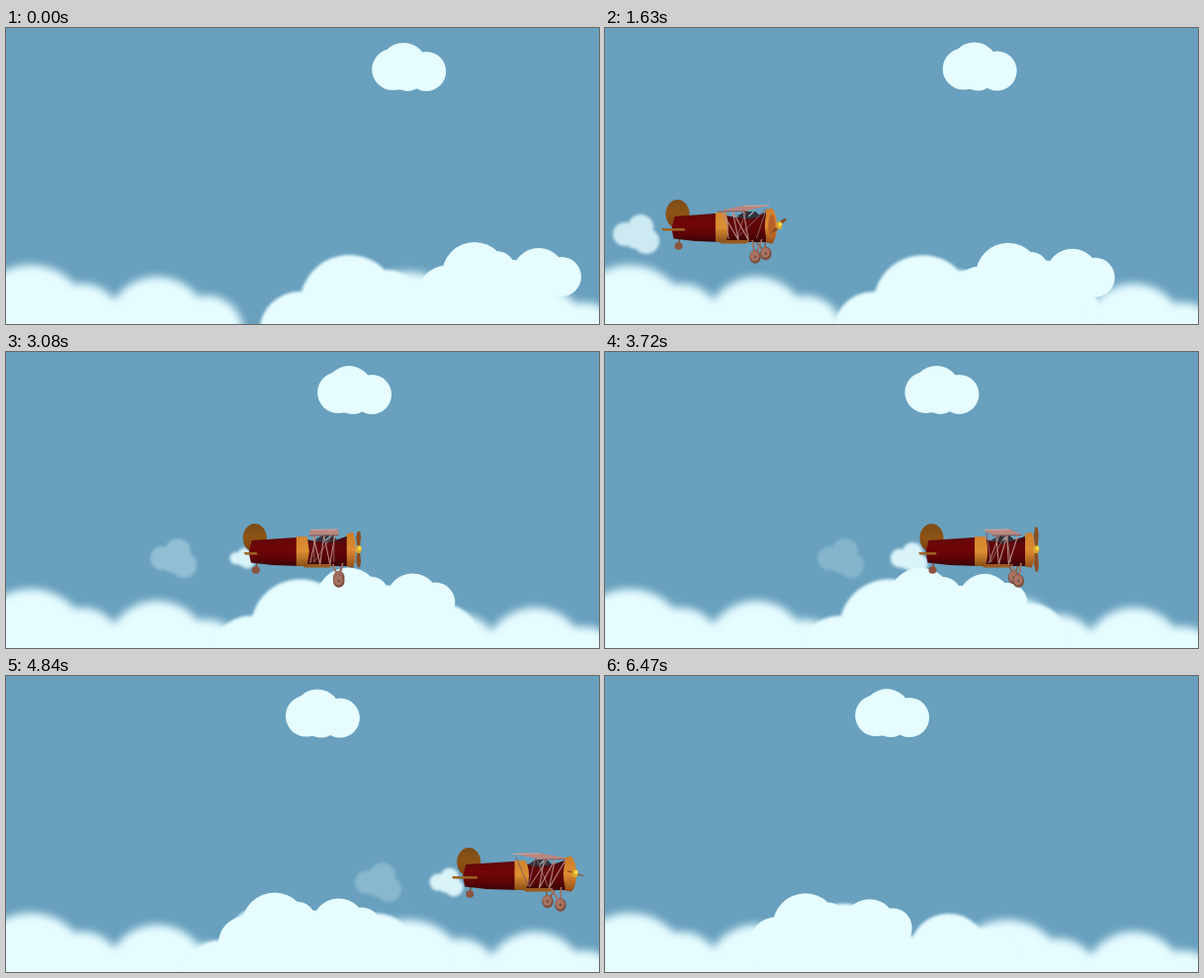
Animation of 600 by 300 pixels, one loop 6570 ms. Source, as an HTML page with a canvas:

```html
<!DOCTYPE html>
<html lang="en">
<head>
<meta charset="utf-8">
<title>Biplane above the clouds</title>
<style>
  html, body { margin: 0; width: 100%; height: 100%; overflow: hidden; background: #68a0be; }
  canvas { display: block; }
</style>
</head>
<body>
<canvas id="stage" width="600" height="300"></canvas>
<script>
const ctx = document.getElementById('stage').getContext('2d');
const LOOP = 6570, SKY = '#68a0be', CLOUD = '#e6fcff';

// Clouds are unions of circles: [x, y, radius]
const TOP = [[21, 42, 21], [32, 39, 24], [36, 46, 18], [55, 44, 20]];
const BACK = [[25, 300, 60], [78, 297, 38], [153, 304, 52], [203, 308, 37]];
const MIDDLE = [[-50, 308, 41], [0, 280, 50], [38, 280, 35], [106, 280, 40], [145, 290, 35]];
const FRONT = [[-29, 269, 28], [0, 250, 33], [22, 246, 20], [40, 262, 27], [65, 250, 27], [88, 252, 20]];
const PUFF = [[-12, 0, 12], [0, 1, 14], [4, -7, 13], [10, 7, 13]];

function cloud(lobes, x, y, blur, base, scale = 1) {
  ctx.filter = blur ? `blur(${blur}px)` : 'none';
  ctx.fillStyle = CLOUD;
  ctx.beginPath();
  for (const [cx, cy, r] of lobes) {
    ctx.moveTo(x + (cx + r) * scale, y + cy * scale);
    ctx.arc(x + cx * scale, y + cy * scale, r * scale, 0, 7);
  }
  if (base) ctx.rect(x + base[0], base[1], base[2], 320 - base[1]);
  ctx.fill();
  ctx.filter = 'none';
}

function oval(x, y, rx, ry, fill) {
  ctx.fillStyle = fill;
  ctx.beginPath();
  ctx.ellipse(x, y, rx, ry, 0, 0, 7);
  ctx.fill();
}

function poly(fill, ...pts) {
  ctx.fillStyle = fill;
  ctx.beginPath();
  pts.forEach(([x, y]) => ctx.lineTo(x, y));
  ctx.closePath();
  ctx.fill();
}

function line(color, width, ...pts) {
  ctx.strokeStyle = color;
  ctx.lineWidth = width;
  ctx.beginPath();
  pts.forEach(([x, y]) => ctx.lineTo(x, y));
  ctx.stroke();
}

function shade(y0, y1, ...colors) {
  const g = ctx.createLinearGradient(0, y0, 0, y1);
  colors.forEach((c, i) => g.addColorStop(i / (colors.length - 1), c));
  return g;
}

function wheel(x, y) {
  oval(x, y, 5.8, 6.8, '#7d4f40');
  oval(x - .5, y - 1, 4.5, 5.2, '#a87461');
  oval(x, y, 1.3, 1.5, '#7d4f40');
}

// v is the viewing angle: -1 seen from ahead, 1 seen from behind
function plane(tail, t) {
  const v = (tail - 240) / 250, turn = Math.abs(v);
  const band = 60 + 5 * v, cowl = 110 + 5 * v, hub = 117 + 3 * v;
  const near = 82 + 20 * v, far = 82 - 14 * v;
  ctx.save();
  ctx.translate(tail, 0);
  ctx.lineJoin = 'round';

  // landing gear, far side
  line('#85594a', 1.5, [90, 215], [97 - 6 * v, 228], [100, 215]);
  wheel(97 - 6 * v, 228.5);
  line('#7a4934', 1.5, [14, 214], [13, 221]);
  oval(13, 221, 4, 3.8, '#8d533d');

  // tail and body
  oval(12, 188.5, 12, 14.5, shade(174, 203, '#7c4c18', '#8e5314', '#774110'));
  poly(shade(187, 217, '#5c0a0c', '#720508', '#640407', '#3a0305'),
    [9, 191], [band, 187.5], [band, 217], [30, 216], [8, 213.5], [6, 203]);
  const reach = 7 * turn;
  poly('#9c6222', [1 - reach, 203], [14 + reach, 203], [15 + reach, 205.5], [2 - reach, 205.5]);
  poly(shade(187, 217, '#3d0f12', '#650609', '#5a0407', '#380305'),
    [band, 189], [band + 14, 192], [cowl - 14, 190], [cowl, 185], [cowl, 217], [band, 217]);
  poly('#33323c', [72, 191], [80, 186], [91, 186], [96, 191], [84, 194]);
  line('#8fb4c2', 1.2, [84, 191], [89, 186]);

  // lower wing and yellow band
  poly('#9a5a1e', [60 + 6 * v, 215], [90 + 6 * v, 215], [88 + 9 * v, 218.5], [62 + 9 * v, 218.5]);
  const edge = 3 + 3 * turn;
  const bandShade = shade(187, 217, '#d38531', '#dc8f32', '#8a4f18');
  poly(bandShade,
    [band - 6, 187], [band + 5, 187], [band + 7, 202], [band + 5, 217], [band - 6, 217]);
  oval(band + (v < 0 ? 1 : 3), 202, edge, 15, bandShade);

  // struts and upper wing
  const strut = '#b98d86';
  line('#8b625f', 1, [far - 10, 183], [72, 213], [far + 10, 183], [92, 213]);
  line(strut, 1.1, [near - 11, 186], [78 + 6 * v, 215], [near, 186], [88 + 6 * v, 215], [near + 11, 186]);
  line(strut, 1, [near - 8, 186], [68 + 6 * v, 214]);
  poly('#b98780', [far - 14, 180], [far + 14, 179.5], [near + 15, 185], [near - 15, 185.5]);
  line('#8b5a55', 1, [near - 15, 186], [near + 15, 185.5]);
  line('#d0a7a0', 1, [far - 13, 180.3], [far + 13, 180]);

  // engine
  const rx = 4 + 3 * turn;
  const cowlShade = shade(183, 218, '#cf7d2c', '#df8b31', '#944d18');
  poly(cowlShade, [cowl - 5, 184], [cowl + 2, 183], [cowl + 2, 218.5], [cowl - 5, 217.5]);
  oval(cowl, 200.8, rx, 17.7, cowlShade);
  if (v < -.25) oval(cowl + 1, 201, rx * .6, 12, '#b5622a');

  // propeller
  const a = .4 + .0156 * (t - 2140);
  const dx = 9 * v * Math.sin(a), dy = 22.5 * Math.cos(a);
  for (const s of [-1, 1])
    poly('#8a4e20', [hub - 1, 200], [hub + s * dx * .65 - 2.6, 200 - s * dy * .65],
      [hub + s * dx - 1, 200 - s * dy], [hub + s * dx + 1.5, 200 - s * dy],
      [hub + s * dx * .65 + 2.4, 200 - s * dy * .65], [hub + 1, 200]);
  oval(hub, 200, 3, 4, '#dda82c');
  oval(hub + 1, 199, 1.6, 2, '#ffe04a');

  // landing gear, near side
  line('#a0705f', 1.8, [91 + 5 * v, 215], [97 + 9 * v, 231], [101 + 5 * v, 214]);
  wheel(97 + 9 * v, 232);
  ctx.restore();
}

function smoke(t) {
  for (let n = 0; n < 8; n++) {
    const age = t - 1340 - 570 * n;
    if (age < 0 || age > 820) continue;
    ctx.globalAlpha = Math.min(.9, (820 - age) / 660);
    cloud(PUFF, 32 + 69 * n, 209, 1.8, null, Math.min(1, .4 + age / 250));
  }
  ctx.globalAlpha = 1;
}

function draw(time) {
  const t = Math.min(6470, Math.max(70, time % LOOP));
  ctx.fillStyle = SKY;
  ctx.fillRect(0, 0, 600, 300);
  cloud(TOP, 371.5 - .0183 * t, -.0003 * t, 0);
  cloud(BACK, 0, 0, 4);
  cloud(BACK, 382, 7, 4);
  cloud(MIDDLE, 348.5 - .0165 * t, .0001 * t, 1.5, [-50, 285, 190]);
  cloud(FRONT, 477 - .0424 * t, .0005 * t, .6, [-50, 264, 125]);
  smoke(t);
  plane(.123 * t - 139.2, t);
}

const start = performance.now();
function tick() {
  draw(performance.now() - start);
  requestAnimationFrame(tick);
}
tick();
</script>
</body>
</html>
```
